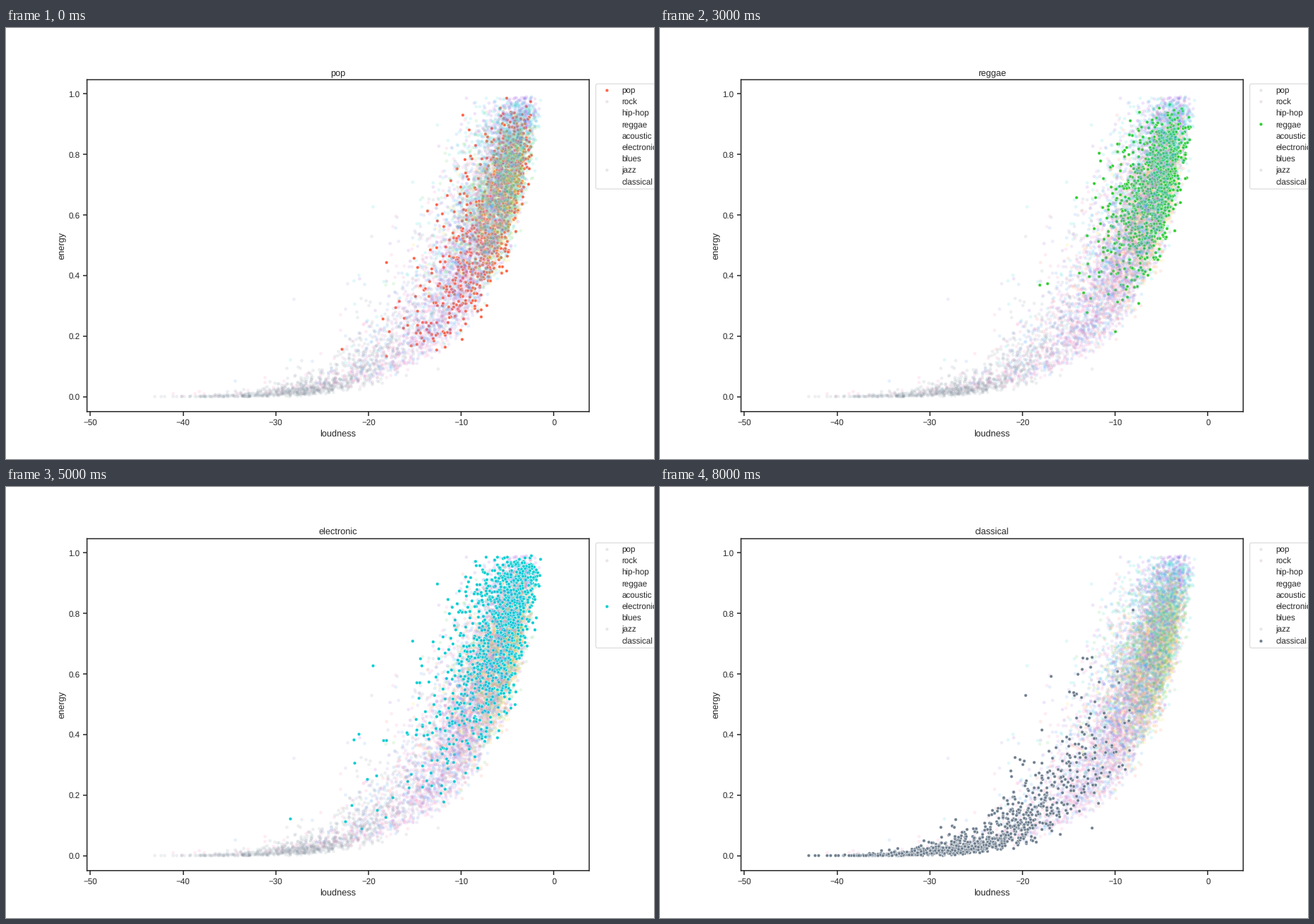
Write a matplotlib script that moves like this. It is 917 px wide and 611 px high and loops after 9000 ms.

```python
import numpy as np
import matplotlib.pyplot as plt
from matplotlib.animation import FuncAnimation
from matplotlib.lines import Line2D

DPI = 76.4
INK = "0.15"
PALE = "#ebe4ea"
FAINT = 0.12
COUNT = 950

plt.rcParams.update({
    "font.family": "Liberation Sans",
    "font.size": 12,
    "text.hinting": "none",
    "text.color": INK,
    "path.snap": False,
    "axes.titlesize": 12,
    "axes.labelsize": 12,
    "axes.labelcolor": INK,
    "axes.edgecolor": INK,
    "axes.linewidth": 1.44,
    "legend.fontsize": 11,
    "legend.labelspacing": 0.43,
    "legend.borderpad": 0.35,
})
for axis in ("xtick", "ytick"):
    plt.rcParams.update({
        f"{axis}.labelsize": 11,
        f"{axis}.color": INK,
        f"{axis}.major.size": 6,
        f"{axis}.major.width": 1.44,
    })

rng = np.random.default_rng(12)


def cloud(a, b, top, slope, spread):
    """Beta energy; loudness grows with its log and trails off to the left."""
    energy = np.maximum(0.995 * rng.beta(a, b, COUNT), 0.005)
    tail = (4 - rng.gamma(4, size=COUNT)) / 2
    width = spread * (1.3 - 0.7 * energy)
    return top + slope * np.log(energy) + width * tail, energy


def quiet_cloud():
    """Normal loudness; energy follows the foot of a logistic curve."""
    loud = rng.normal(-24, 7, COUNT)
    loud = loud[(loud > -48) & (loud < -8)]
    curve = 0.58 / (1 + np.exp(-(loud + 14) / 4.2))
    noise = rng.normal(size=loud.size) * (0.15 - 0.017 * loud)
    return loud, np.maximum(curve * np.exp(noise), 0.001)


GENRES = {
    "pop": ("tomato", cloud(3.6, 2.3, -3.6, 6.1, 2.0)),
    "rock": ("blueviolet", cloud(3.2, 1.3, -3.9, 7.0, 2.5)),
    "hip-hop": ("gold", cloud(8, 4.4, -3.7, 5.6, 1.8)),
    "reggae": ("limegreen", cloud(7.5, 3.4, -3.7, 6.0, 2.2)),
    "acoustic": ("mediumpurple", cloud(2.2, 2.7, -4.2, 6.4, 2.0)),
    "electronic": ("darkturquoise", cloud(3.6, 1.5, -4.1, 7.2, 2.9)),
    "blues": ("dodgerblue", cloud(1.9, 1.8, -4.2, 6.6, 2.3)),
    "jazz": ("hotpink", cloud(1.25, 1.8, -5.2, 6.2, 2.4)),
    "classical": ("slategray", quiet_cloud()),
}
ALWAYS_KEYED = {"pop", "rock", "jazz"}

fig, ax = plt.subplots(figsize=(917.001 / DPI, 611.001 / DPI), dpi=DPI)
ax.set(xlim=(-50.36, 3.81), ylim=(-0.049, 1.0465),
       xlabel="loudness", ylabel="energy",
       xticks=range(-50, 1, 10), yticks=np.linspace(0, 1, 6))

names = list(GENRES)
dots = [ax.scatter(*points, s=20, color=color, edgecolor="white",
                   linewidth=0.45)
        for color, points in GENRES.values()]

samples = [Line2D([], [], ls="", marker="o", ms=4.5, mec="white", mew=0.45)
           for _ in names]
legend = ax.legend(samples, names, loc="upper left",
                   bbox_to_anchor=(1.005, 1))
keys = legend.legend_handles
title = ax.set_title(names[0])


def update(i):
    title.set_text(names[i])
    for k, (name, (color, _)) in enumerate(GENRES.items()):
        active = k == i
        dots[k].set_alpha(1 if active else FAINT)
        keys[k].set_markerfacecolor(color if active else PALE)
        keys[k].set_visible(active or name in ALWAYS_KEYED)
    return [title, *dots, *keys]


anim = FuncAnimation(fig, update, frames=len(names), interval=1000,
                     repeat=True, repeat_delay=0, blit=False)
plt.show()
```
